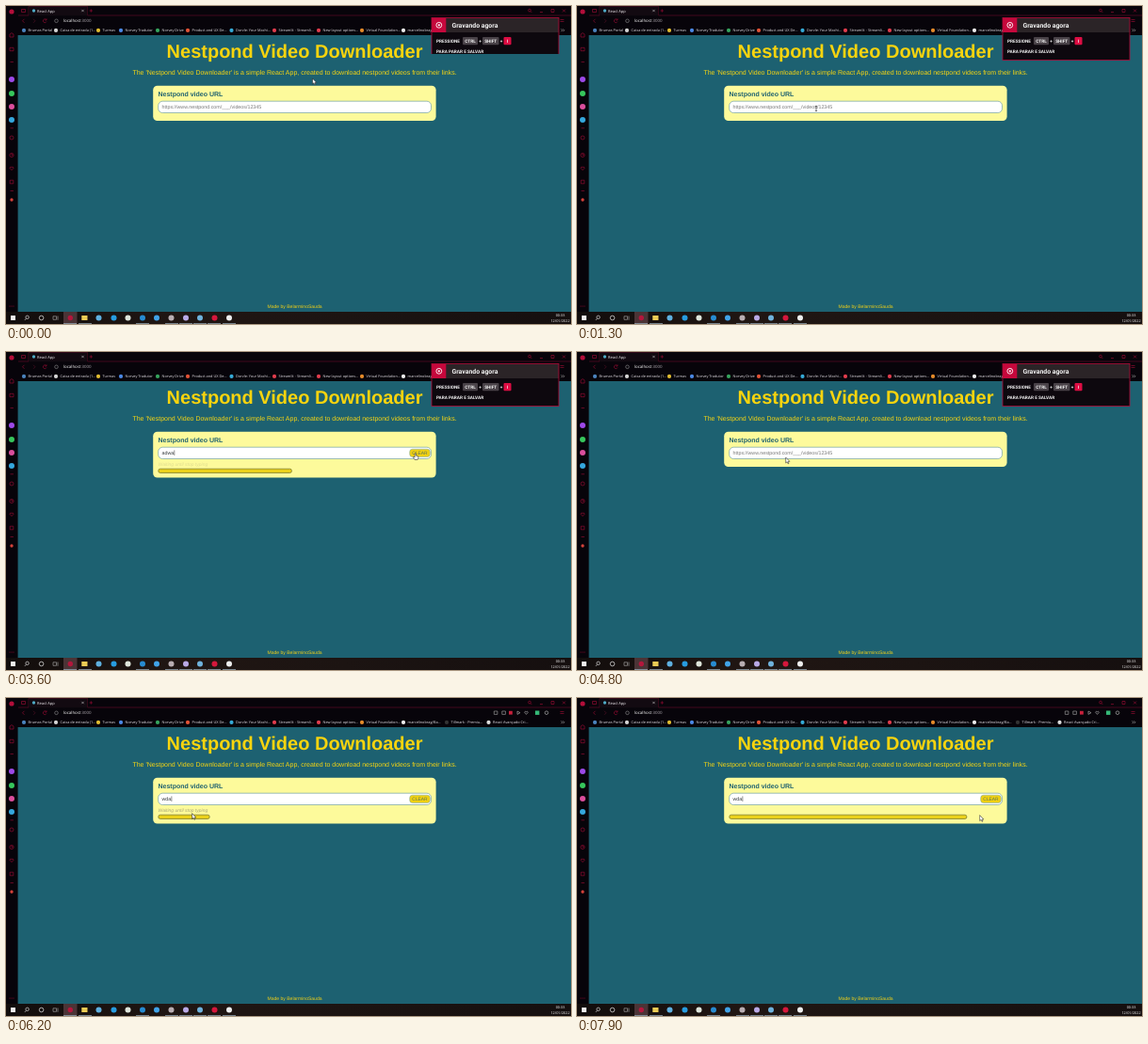
Animation, 600 px wide and 338 px high, one loop 8 s. Source, as an HTML page:

```html
<!DOCTYPE html>
<html lang="pt">
<head>
<meta charset="utf-8">
<title>Video Downloader</title>
<style>
html, body { margin: 0; width: 100%; height: 100%; overflow: hidden; background: #07040a; }
svg { display: block; width: 600px; height: 338px; }
text { font-family: "Liberation Sans", Arial, sans-serif; text-rendering: geometricPrecision; white-space: pre; }
.ui { font-family: "Open Sans", "Noto Sans", sans-serif; }
.pop { font-family: Roboto, "Open Sans", sans-serif; font-weight: 700; fill: #f4f4f4; }
</style>
</head>
<body>
<svg id="stage" viewBox="0 0 600 338" xmlns="http://www.w3.org/2000/svg">
  <defs>
    <clipPath id="popClip"><rect id="popMask" x="451" y="12" width="138" height="40"/></clipPath>
    <linearGradient id="taskFill">
      <stop offset="0" stop-color="#120d0c"/><stop offset=".3" stop-color="#201613"/>
      <stop offset=".6" stop-color="#1c1412"/><stop offset="1" stop-color="#150f0f"/>
    </linearGradient>
  </defs>
  <rect width="600" height="338" fill="#07040a"/>
  <rect x="12.6" y="31" width="587.4" height="294" fill="#1d6171"/>
  <g id="chrome"></g>

  <g id="page">
    <text x="306.5" y="55" font-size="20" font-weight="700" text-anchor="middle" fill="#f8d40e">Nestpond Video Downloader</text>
    <text x="306.5" y="73" font-size="7" text-anchor="middle" fill="#f8d612">The 'Nestpond Video Downloader' is a simple React App, created to download nestpond videos from their links.</text>
    <rect id="card" x="156.2" y="84.8" width="300.4" height="37.2" rx="4.5" fill="#fdfa9b"/>
    <text x="161.5" y="96" font-size="7" font-weight="700" fill="#1d6170">Nestpond video URL</text>
    <rect x="161.7" y="101.2" width="289.8" height="12.3" rx="4.6" fill="#fff" stroke="#5c929f" stroke-width=".6"/>
    <text id="field" x="165.5" y="109.1" font-size="5.34"></text>
    <rect id="caret" y="104.4" width=".5" height="5.6" fill="#222"/>
    <g id="clear">
      <rect x="428.7" y="103.2" width="21.6" height="8.4" rx="3" fill="#f0d012" stroke="#6fa3a3" stroke-width=".5"/>
      <text x="439.5" y="109.1" font-size="4.9" text-anchor="middle" fill="#57725a">CLEAR</text>
    </g>
    <g id="wait">
      <text id="hint" x="161.5" y="121" font-size="5" font-style="italic" fill="#85856a">Waiting until stop typing</text>
      <rect id="bar" x="161.8" y="124.2" height="4.3" rx="2" fill="#ead01a" stroke="#5b5f22" stroke-width=".6"/>
    </g>
    <text x="306.5" y="321" font-size="5.05" text-anchor="middle" fill="#f2d016">Made by BelarminoSauda</text>
  </g>

  <g id="popup" clip-path="url(#popClip)">
    <rect x="452" y="12.5" width="135" height="45" fill="#0d080e"/>
    <rect x="467" y="12.5" width="120" height="15.5" fill="#2b2427"/>
    <rect x="452" y="12.5" width="15.3" height="15.5" fill="#c5083c"/>
    <circle cx="459.8" cy="20.3" r="2.9" fill="none" stroke="#fff" stroke-width=".9"/>
    <circle cx="459.8" cy="20.3" r="1.1" fill="#fff"/>
    <text class="pop" x="473.5" y="22.7" font-size="6.9">Gravando agora</text>
    <text class="pop" x="457" y="39" font-size="4.7">PRESSIONE</text>
    <g fill="#494248">
      <rect x="485" y="33" width="16" height="8.3" rx="1"/>
      <rect x="506" y="33" width="17.5" height="8.3" rx="1"/>
      <rect x="528.5" y="33" width="8" height="8.3" rx="1" fill="#dd0d43"/>
    </g>
    <g text-anchor="middle" font-size="4.7">
      <text class="pop" x="493" y="39">CTRL</text><text class="pop" x="503.5" y="39">+</text>
      <text class="pop" x="514.7" y="39">SHIFT</text><text class="pop" x="526" y="39">+</text>
      <text class="pop" x="532.5" y="39">I</text>
    </g>
    <text class="pop" x="457" y="49.6" font-size="4.7">PARA PARAR E SALVAR</text>
    <rect x="452" y="12.5" width="135" height="45" fill="none" stroke="#b30b39" stroke-width=".8"/>
  </g>

  <g id="arrow"><path d="M0 0V6L1.4 4.7L2.4 6.8L3.3 6.4L2.4 4.4H4.2Z" fill="#fff" stroke="#111" stroke-width=".5"/></g>
  <g id="beam"><path d="M-1.1 -2.6H1.1M0 -2.6V2.6M-1.1 2.6H1.1" stroke="#222" stroke-width=".6"/></g>
  <g id="hand"><path d="M-.9 -3.2Q-.3 -3.9 .2 -3.2V-.9L2.7 -.2Q3.2 2 2.1 3.5H-1L-2.7 .7Q-2.3 -.1 -.9 .9Z" fill="#fff" stroke="#111" stroke-width=".5"/></g>
</svg>
<script>
const $ = id => document.getElementById(id);
const set = (id, attrs) => Object.entries(attrs).forEach(([k, v]) => $(id).setAttribute(k, v));
const show = (id, on) => $(id).setAttribute('display', on ? 'inline' : 'none');
const clamp = v => Math.min(1, Math.max(0, v));
const RED = '#a50c36';

// Static browser window and taskbar
const rect = (x, y, w, h, fill) => `<rect x="${x}" y="${y}" width="${w}" height="${h}" fill="${fill}"/>`;
const dot = (x, y, r, fill) => `<circle cx="${x}" cy="${y}" r="${r}" fill="${fill}"/>`;
const ring = (x, y, r, color, w = .8) => `<circle cx="${x}" cy="${y}" r="${r}" fill="none" stroke="${color}" stroke-width="${w}"/>`;
const line = (d, color = RED, w = .6) => `<path d="${d}" fill="none" stroke="${color}" stroke-width="${w}"/>`;
const label = (x, y, size, s, fill = '#e6e3e7', extra = '') => `<text class="ui" x="${x}" y="${y}" font-size="${size}" fill="${fill}" ${extra}>${s}</text>`;

function windowFrame() {
  let s = line('M13 10H24V.5H86.5V10H600', '#7d0c2d', .5);
  s += rect(24.3, .7, 62, 9.6, '#120a11') + dot(29.5, 5, 1.7, '#4ea9c4') + label(33, 6.5, 4, 'React App', '#f2eef2');
  s += line('M80.3 3.8l2.4 2.4m0-2.4l-2.4 2.4', '#ddd', .5) + line('M88.6 5h3.4M90.3 3.3v3.4') + line('M16.5 3.5h4v3h-4z');
  s += line('M19.5 13.8l-2 2l2 2') + line('M29 13.8l2 2l-2 2', '#5b1229');
  s += line('M42.6 14.4A1.9 1.9 0 1 0 43 16.6M43 13.4v1.6h-1.6');
  s += ring(53.5, 15.8, 1.8, '#aaa', .5) + label(61, 17.4, 4.4, 'localhost<tspan fill="#aaa5ab">:3000</tspan>', '#fff');
  s += ring(556, 4.6, 1.4, RED, .6) + line('M557 5.6l1.3 1.3M567 6.5h3M579 3.5h3v3h-3zM591 3.5l3 3m0-3l-3 3');
  s += line('M518.3 14h3.6v3.4h-3.6zM526.8 14h3.6v3.4h-3.6z', '#aaa') + rect(534, 13.8, 3.8, 3.8, '#c8203c');
  s += line('M543 14l3 1.7l-3 1.7z', '#bbb') + line('M552.5 17.4l-1.9-2.2q.9-1.8 1.9-.5q1-1.3 1.9 .5z', '#bbb');
  return s + rect(562, 13.5, 4.4, 4.4, '#35b877') + ring(574, 15.7, 1.8, '#aaa', .7) + line('M588.5 14.5h4m-4 2h4');
}

function bookmarks() {
  const items = [
    [19, '#4b83bd', 'Brumas Portal'], [53, '#d5d5d5', 'Caixa de entrada (1...'], [98, '#e2bd31', 'Turmas'],
    [122, '#4b88e5', 'Norvey Tradutor'], [161, '#36a45e', 'Norvey Drive'], [193, '#e25336', 'Product and UX De...'],
    [239.5, '#35a9d6', 'Dorvle: Your Machi...'], [285, '#e13d4d', 'Streamlit - Streamli...'], [332, '#e13d4d', 'New layout options...'],
    [378, '#e58b2a', 'Virtual Foundation...'], [422, '#eee', 'marcelinobrag/Ba...'], [468, '#333', 'Tillmark - Premiu...'],
    [512.5, '#ddd', 'React Avançado Cri...']
  ];
  return items.map(([x, c, s]) => dot(x, 25.9, 2.1, c) + label(x + 4.6, 27.3, 3.85, s)).join('') +
    line('M589.5 24.4l1.4 1.4l-1.4 1.4m2-2.8l1.4 1.4l-1.4 1.4', '#bbb');
}

function sidebar() {
  let s = dot(6, 6, 2.6, '#b30e3a');
  s += line('M4 33V30L6 28.6L8 30V33Z') + line('M4 44.3h4v3.4H4zM4.5 59.5h3.4M4.5 129.8h3.4M4.5 196.5h3.4');
  [[78, '#9d49e8'], [93, '#37c65c'], [107, '#db4e9c'], [121, '#35a7dd']].forEach(([y, c]) => s += dot(6, y, 3, c));
  s += ring(6, 140, 2, RED, .6) + ring(6, 158.5, 2.1, RED, .6) + line('M6 157V158.5H7.3');
  s += line('M6 174.5L3.9 172.2Q4.6 170 6 171.5Q7.4 170 8.1 172.2Z') + line('M4.2 185.2h3.6v3.6H4.2z') + dot(6, 206, 1.7, '#d5433a');
  return s + [4, 6, 8].map(x => dot(x, 319, .5, RED)).join('');
}

function taskbar() {
  let s = rect(0, 325, 600, 13, 'url(#taskFill)') + rect(61, 325, 14.5, 13, '#4b3436') + rect(5, 329, 5, 5, '#eee');
  s += ring(22.6, 330.8, 1.7, '#ddd', .7) + line('M21.4 332.2l-1.5 1.7', '#ddd', .7) + ring(37.6, 331.5, 2.3, '#eee', .7);
  s += line('M50 329.8h3.5v3.5H50zM55 329.5v4.3', '#ccc', .5);
  s += dot(68.3, 331.5, 2.7, '#b3173c') + rect(80.3, 329, 6.2, 5, '#eacb55');
  const apps = [
    [98.5, '#5fb0e0'], [114.5, '#279ce0'], [129.5, '#dfe6dc'], [145, '#278bd1'], [160, '#41a3e8'],
    [175.5, '#b9aeb2'], [191, '#b9a9e6'], [206, '#6fb2dc'], [221.5, '#d5173c'], [237, '#eee']
  ];
  s += apps.map(([x, c]) => dot(x, 331.6, 3, c)).join('');
  [61, 77, 138, 169, 184, 199, 214, 230].forEach(x => s += rect(x, 337.2, 14, .8, '#8fa0ad'));
  const clock = (y, t) => label(588.5, y, 3.8, t, '#fff', 'text-anchor="middle"');
  return s + clock(330, '00:33') + clock(336.2, '12/01/2022');
}

$('chrome').innerHTML = windowFrame() + bookmarks() + sidebar() + taskbar();

// Motion
const LOOP = 8000, BAR_SPEED = .1163, CLEAR_AT = 3850;
const PLACEHOLDER = 'https://www.nestpond.com/___/videos/12345';
const keys = [[2060, 'a'], [2287, 'ad'], [2340, 'adw'], [2385, 'adwa'], [CLEAR_AT, ''], [5480, 'w'], [5600, 'wd'], [5735, 'wda']];
const path = [
  [0, 325.5, 77, 'arrow'], [200, 325, 78, 'arrow'], [900, 258, 109, 'beam'], [1300, 254, 109, 'beam'], [1800, 220, 109, 'beam'],
  [2700, 220, 109, 'beam'], [3450, 435, 111, 'hand'], [3950, 435, 111, 'hand'], [4700, 221.7, 112, 'arrow'],
  [5600, 221.7, 112, 'arrow'], [6150, 197.6, 122.6, 'arrow'], [6450, 197.6, 122.6, 'arrow'],
  [7250, 360, 137, 'arrow'], [7850, 427.7, 124.6, 'arrow'], [LOOP, 427.7, 124.6, 'arrow']
];

function pointer(t) {
  const i = path.findIndex((p, n) => n + 1 < path.length && t < path[n + 1][0]);
  const [t0, x0, y0, from] = path[i], [t1, x1, y1, to] = path[i + 1];
  const u = (t - t0) / (t1 - t0), e = u * u * (3 - 2 * u);
  const x = x0 + (x1 - x0) * e, y = y0 + (y1 - y0) * e;
  let kind = from;
  if (from !== to) {
    const inField = x > 162 && x < 428 && y > 101 && y < 113.5;
    kind = x >= 428 ? 'hand' : inField ? 'beam' : 'arrow';
  }
  for (const id of ['arrow', 'beam', 'hand']) show(id, id === kind);
  set(kind, { transform: `translate(${x} ${y})` });
}

function form(t) {
  const [since, value] = keys.filter(k => k[0] <= t).pop() || [0, ''];
  const active = value !== '', age = t - since;
  const first = t < CLEAR_AT ? keys[0][0] : 5480;
  $('field').textContent = value || PLACEHOLDER;
  set('field', { fill: active ? '#343a3c' : '#777' });
  show('caret', active);
  if (active) set('caret', { x: 165.9 + $('field').getComputedTextLength() });
  set('card', { height: active ? 48.7 : 37.2 });
  show('clear', active);
  set('clear', { opacity: clamp((t - first - 300) / 250) });
  show('wait', active);
  set('hint', { opacity: clamp(1 - age / 1600) });
  set('bar', { width: Math.min(289, .2 + age * BAR_SPEED) });
}

function popup(t) {
  const open = 39 + 7 * clamp(t / 400);
  const h = open * (1 - clamp((t - 4820) / 280));
  show('popup', h > 0);
  set('popMask', { height: h });
}

function render(t) { pointer(t); form(t); popup(t); }

const start = performance.now();
(function tick() {
  render((performance.now() - start) % LOOP);
  requestAnimationFrame(tick);
})();
</script>
</body>
</html>
```
